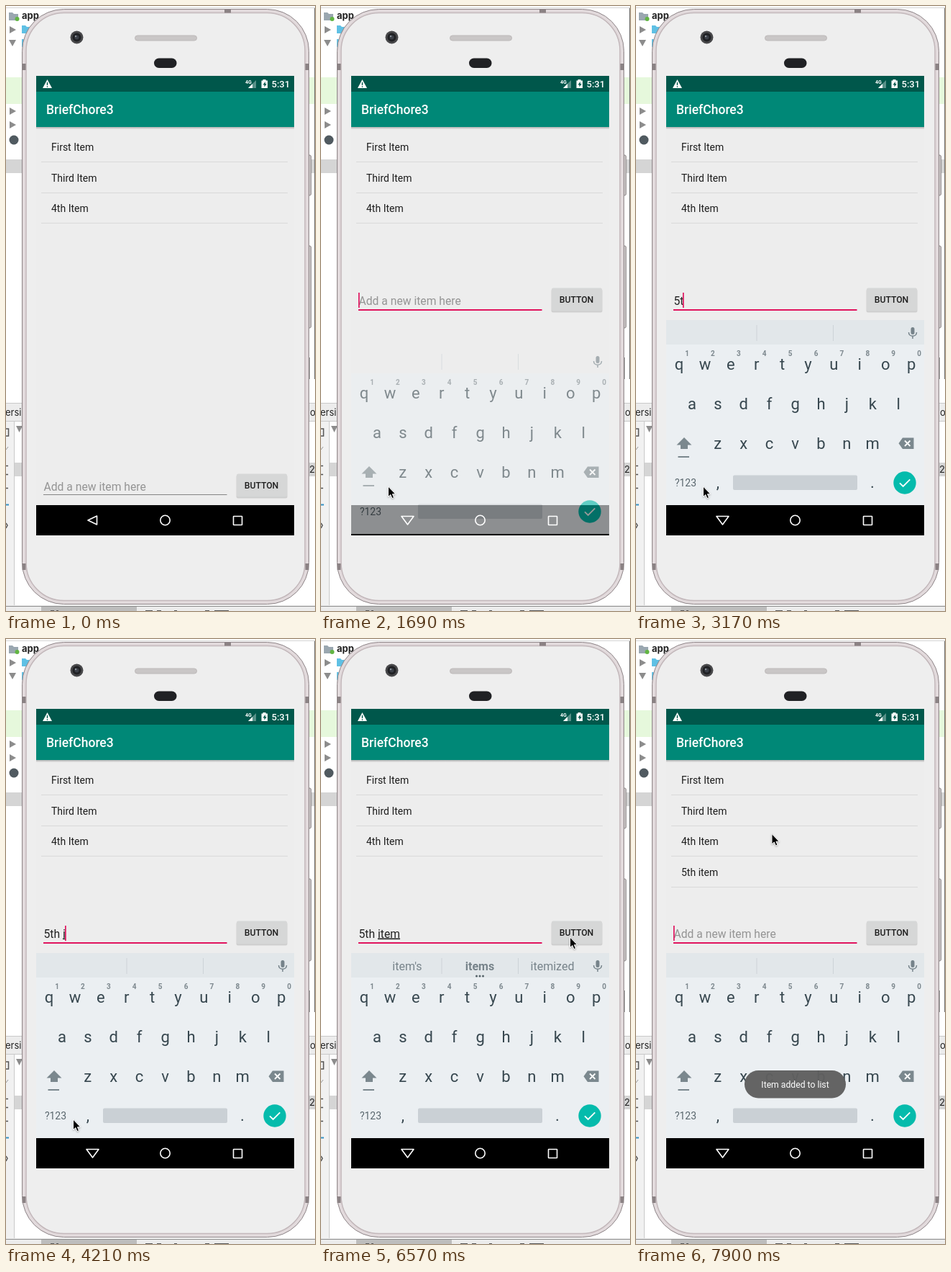
Animation of 430x840 px, one loop 8 s. Source, as an HTML page:

```html
<!DOCTYPE html>
<html lang="en">
<head>
<meta charset="utf-8">
<title>To-do list demo</title>
<style>
html, body { margin: 0; width: 100%; height: 100%; overflow: hidden; background: #fff; }
svg { display: block; width: 430px; height: 840px; }
text { font-family: Roboto, "Open Sans", sans-serif; white-space: pre; }
.mid { text-anchor: middle; }
.ide { font: 13px Inter, sans-serif; fill: #222; }
.bold { font-weight: 700; }
.item { font-size: 14px; fill: #1d1d1d; }
.entry { font-size: 15.7px; }
.key { font-size: 22px; fill: #37474f; text-anchor: middle; }
.digit { font-size: 10px; font-weight: 700; fill: #7d888e; text-anchor: middle; }
.word { font-size: 16px; fill: #77838a; text-anchor: middle; }
#mouse { filter: drop-shadow(0 1px 1px rgba(0, 0, 0, .3)); }
</style>
</head>
<body>
<svg viewBox="0 0 430 840" width="430" height="840">
  <defs>
    <linearGradient id="shade" x1="0" x2="0" y1="0" y2="1">
      <stop offset="0" stop-color="#000" stop-opacity=".25"/><stop offset="1" stop-color="#000" stop-opacity="0"/>
    </linearGradient>
  </defs>

  <!-- editor window behind the phone -->
  <g id="window">
    <rect width="430" height="840" fill="#fff"/>
    <path d="M0 2.5H430" stroke="#d4d4d4"/>
    <rect y="99" width="429" height="37" fill="#e6f8dc"/>
    <rect y="213" width="429" height="19" fill="#d5d5d5"/>
    <path d="M429.5 3V518" stroke="#777"/>
    <path d="M4 9h5l2 2h6v9H4z" fill="#9aa7b0"/>
    <circle cx="15.5" cy="18" r="3" fill="#62b543"/>
    <text class="ide bold" x="22" y="18">app</text>
    <path d="M5 28l9 5-9 5zM4 47h10l-5 9zM5 141l9 5-9 5zM5 160l9 5-9 5z" fill="#8c8c8c"/>
    <path d="M22 27h5l2 2h8v9H22zM22 46h5l2 2h8v9H22z" fill="#5fc0e4"/>
    <circle cx="11" cy="186" r="6.5" fill="#505a60"/>
    <rect y="551" width="430" height="26" fill="#ececec"/>
    <path d="M0 551.5H430M0 576.5H430" stroke="#c9c9c9"/>
    <text class="ide" x="-1" y="569">ersi</text>
    <text class="ide" x="423" y="569">o</text>
    <rect y="577" width="11" height="256" fill="#f1f1f1"/>
    <path d="M11.5 577V832" stroke="#c9c9c9"/>
    <path d="M14 583h9l-4.5 9z" fill="#8c8c8c"/>
    <rect x="12" y="634" width="418" height="19" fill="#d5d5d5"/>
    <text class="ide" x="422" y="648">2</text>
    <path d="M0 587h3.5v10H0M0 638.5h3M0 650.5h3M0 669.5h3M0 718l2 3-2 4" fill="none" stroke="#555" stroke-width="1.5"/>
    <path d="M0 616l3-4" stroke="#999"/>
    <path d="M0 692.5h4" stroke="#3592c4" stroke-width="2"/>
    <rect y="832" width="430" height="8" fill="#ececec"/>
    <rect x="49" y="834" width="133" height="6" fill="#bdbdbd"/>
    <path d="M0 833.5H430" stroke="#8f8f8f"/>
    <path d="M62 839.5h5M70 839.5h3M194 839.5h10M210 839.5h6M234 839.5h4M277 839.5h6M290 839.5h20" stroke="#555"/>
  </g>

  <!-- phone -->
  <g id="phone">
    <rect x="419" y="207" width="5.5" height="56" rx="2" fill="#cfcaca" stroke="#8b8687"/>
    <rect x="419" y="333" width="5.5" height="114" rx="2" fill="#cfcaca" stroke="#8b8687"/>
    <path d="M422.5 488V518" stroke="#999"/>
    <rect x="22.5" y="4.5" width="399" height="826" rx="58" fill="#e2dadc" stroke="#8d8487"/>
    <rect x="28" y="9.5" width="388" height="816" rx="52.5" fill="#eee" stroke="#c3b8bb" stroke-width="1.5"/>
    <path d="M304 4.5h9v5h-9zM22.5 80h5v9h-5zM416.5 80h5v9h-5zM22.5 774h5v9h-5zM416.5 774h5v9h-5z" fill="#8b8284"/>
    <rect x="179.5" y="41" width="86" height="7" rx="3.5" fill="#c9c6c6" stroke="#bdb9b9"/>
    <circle cx="98.5" cy="43.5" r="9" fill="#48484a"/>
    <circle cx="98.5" cy="43.5" r="6" fill="#202124"/>
    <circle cx="98.5" cy="43.5" r="3" fill="#3c4048"/>
    <circle cx="97" cy="42" r="1.2" fill="#8d949c"/>
    <rect x="206" y="72.5" width="31.5" height="13.5" rx="6.75" fill="#202124"/>
  </g>

  <!-- app -->
  <rect x="42" y="97" width="359" height="638" fill="#ededed"/>
  <rect x="42" y="97" width="359" height="22" fill="#00574b"/>
  <rect x="42" y="119" width="359" height="49" fill="#008877"/>
  <rect x="42" y="168" width="359" height="3.5" fill="url(#shade)"/>
  <path d="M57.5 102l6.5 12H51z" fill="#fff"/>
  <path d="M57.5 106v4M57.5 111.2v1.6" stroke="#00574b" stroke-width="1.4"/>
  <text x="333" y="108" font-size="7" font-weight="700" fill="#fff">4G</text>
  <path d="M348 103v11h-11z" fill="#fff" opacity=".35"/>
  <path d="M343 108v6h-6z" fill="#fff"/>
  <path d="M357.5 102h4v1.5h2.5V114h-8.5v-10.5h2z" fill="#fff"/>
  <path d="M360.8 105l-3.3 4.5h2v3l3.2-4.5h-1.9z" fill="#00574b"/>
  <text x="369.5" y="112.5" font-size="13" font-weight="500" fill="#fff">5:31</text>
  <text x="56" y="150" font-size="17.5" font-weight="500" fill="#fff">BriefChore3</text>
  <g id="list"></g>

  <g id="form">
    <text id="entry" class="entry" x="52.5" y="414.5"><tspan id="plain"></tspan><tspan id="composing" text-decoration="underline"></tspan></text>
    <rect id="line" x="52" width="255.5"/>
    <rect id="caret" y="398" width="1.7" height="21" fill="#e0145e"/>
    <rect x="320.5" y="393" width="71" height="32.5" rx="2.5" fill="#000" opacity=".13"/>
    <rect id="button" x="321" y="391.5" width="70" height="32" rx="2"/>
    <text class="mid" x="355.5" y="412" font-size="12.2" font-weight="500" fill="#1d1d1d">BUTTON</text>
  </g>

  <rect x="42" y="693" width="359" height="42" fill="#000"/>
  <g id="keyboard">
    <rect x="42" y="470" width="359" height="223" fill="#ebeff2"/>
    <rect id="strip" x="42" y="436" width="359" height="34" fill="#e2e7ea"/>
    <path d="M168 443v22M274.5 443v22" stroke="#cdd3d7"/>
    <g id="words"></g>
    <g id="dots" fill="#546168"><circle cx="216.5" cy="468" r="1.5"/><circle cx="221" cy="468" r="1.5"/><circle cx="225.5" cy="468" r="1.5"/></g>
    <rect x="382.5" y="446" width="5" height="10" rx="2.5" fill="#76838a"/>
    <path d="M379.5 453c0 7 11 7 11 0M385 458.5v3.5" fill="none" stroke="#76838a" stroke-width="1.5"/>
    <g id="keys"></g>
    <path d="M67 599l10.5 10.5H72v5.5H62v-5.5h-5.5zM58.5 625h15.5v2H58.5z" fill="#7b888e"/>
    <path d="M371 599.5h15.5v15.5H371l-5.5-7.75z" fill="#7b888e"/>
    <path d="M374 603.5l7.5 7.5m0-7.5l-7.5 7.5" stroke="#fff" stroke-width="1.8"/>
    <text class="mid" x="69" y="667" font-size="14" fill="#5a676e">?123</text>
    <g id="marks"><text class="key" x="114" y="669">,</text><text class="key" x="329" y="669">.</text></g>
    <rect x="135" y="651.5" width="173" height="20.5" rx="2" fill="#cad0d5"/>
    <circle cx="374" cy="662" r="15.7" fill="#05bbac"/>
    <path d="M367 662.3l4.7 4.7 9.6-9.6" fill="none" stroke="#fff" stroke-width="1.8"/>
  </g>
  <g fill="none" stroke="#fff" stroke-width="1.6">
    <path id="back" stroke-linejoin="round"/>
    <circle cx="221.5" cy="714" r="6.7"/>
    <rect x="316.5" y="708.5" width="12" height="12" rx=".5"/>
  </g>

  <g id="toast">
    <rect x="151" y="599" width="141" height="38.5" rx="19.25" fill="#5f5f5f"/>
    <text class="mid" x="221.5" y="623" font-size="12.2" fill="#fff">Item added to list</text>
  </g>
  <path id="mouse" d="M0 0V14.5L3.3 11.5L5.5 16.6L8 15.5L5.9 10.7H10.3Z" fill="#000" stroke="#fff" stroke-width="1"/>
</svg>

<script>
const LOOP = 8000, TICK = 148, START = 495;
const $ = id => document.getElementById(id);
const show = (id, on) => $(id).setAttribute('visibility', on ? 'visible' : 'hidden');
const set = (id, attrs) => { for (const a in attrs) $(id).setAttribute(a, attrs[a]); };
const label = (cls, x, y, s) => `<text class="${cls}" x="${x}" y="${y}">${s}</text>`;
const between = (k, a, b) => k >= a && k < b;

$('list').innerHTML = ['First Item', 'Third Item', '4th Item', '5th item'].map((s, i) => {
  const y = 201 + i * 42.5, rule = Math.floor(216.5 + i * 42.6) + .5;
  return `<g id="item${i}">${label('item', 63, y, s)}<path d="M49 ${rule}H392" stroke="#d9d9d9"/></g>`;
}).join('');

const PITCH = 35.9;
$('keys').innerHTML = [['qwertyuiop', 60, 505], ['asdfghjkl', 78, 560], ['zxcvbnm', 113.8, 615]]
  .map(([row, x, y]) => [...row].map((c, i) => label('key', x + i * PITCH, y, c)).join('')).join('')
  + [...'1234567890'].map((c, i) => label('digit', 71 + i * PITCH, 486, c)).join('');
$('words').innerHTML = [120, 221, 322].map((x, i) =>
  `<text id="word${i}" class="word${i === 1 ? ' bold' : ''}" x="${x}" y="460"></text>`).join('');

// [first tick, settled text, underlined text]
const TYPED = [[0, '', ''], [16, '5', ''], [18, '5t', ''], [19, '5', 'th'], [23, '5th ', ''],
  [25, '5th ', 'i'], [27, '5th ', 'it'], [29, '5th ', 'ite'], [31, '5th ', 'item'], [44, '', '']];
const WORDS = [[0], [19, 'thanks', 'the', 'this'], [20], [26, 'in', 'I', 'is'], [28, "it's", 'it', 'its'],
  [30, 'items', 'item', 'iterate'], [31, "item's", 'items', 'itemized'], [44]];
// [first tick, last tick, from, to]
const MOVES = [[0, 4, [269, 517.5], [93.5, 667]], [34, 41, [93.5, 667], [346.5, 414]], [46, 50, [346.5, 414], [189, 270.5]]];
const CARET_OFF = [[11, 14], [23, 25], [34, 38], [41, 44], [47, 50]];

const latest = (rows, k) => rows.filter(r => r[0] <= k).pop() || rows[0];
const ease = u => u * u * (3 - 2 * u);

function drawForm(k) {
  const focused = k >= 7, raised = k >= 8;
  const [, plain, composing] = latest(TYPED, k);
  const empty = !(plain + composing);
  // The space after "5th" lands before the underline clears.
  const gap = between(k, 20, 23) ? 15.7 * .248 : 0;
  $('plain').textContent = empty ? 'Add a new item here' : plain;
  $('composing').textContent = composing;
  set('entry', { fill: empty ? '#949494' : '#222' });
  const width = empty ? 0 : $('entry').getComputedTextLength() + gap;
  set('caret', { x: 52 + Math.floor(width) });
  show('caret', focused && !CARET_OFF.some(([a, b]) => between(k, a, b)));
  set('line', focused ? { y: 421, height: 2, fill: '#e0145e' } : { y: 420, height: 1, fill: '#858585' });
  set('button', { fill: k === 43 ? '#bcbdbd' : k === 44 ? '#c8c9c9' : '#d6d7d7' });
  set('form', { transform: `translate(0 ${raised ? 0 : 258})` });
}

function drawKeyboard(k) {
  const rising = k === 8;
  show('keyboard', k >= 8);
  set('keyboard', { opacity: rising ? .6 : 1, transform: `translate(0 ${rising ? 40 : 0})` });
  set('strip', { opacity: rising ? .15 : 1 });
  set('marks', { opacity: rising ? 0 : 1 });
  const words = latest(WORDS, k).slice(1);
  for (let i = 0; i < 3; i++) $('word' + i).textContent = words[i] || '';
  set('dots', { opacity: words.length ? 1 : 0 });
  set('back', { d: k >= 8 ? 'M112 708.5H129L120.5 720Z' : 'M126.5 708V720L114 714Z' });
}

function drawMouse(k) {
  const [a, b, p, q] = latest(MOVES, k);
  const u = ease(Math.min(1, Math.max(0, (k - a) / (b - a))));
  const [x, y] = p.map((v, i) => v + (q[i] - v) * u);
  set('mouse', { transform: `translate(${x} ${y})` });
  show('mouse', k >= 0);
}

function render(ms) {
  const k = Math.floor((ms - START) / TICK);
  drawForm(k);
  drawKeyboard(k);
  drawMouse(k);
  show('item3', k >= 44);
  set('toast', { opacity: k < 45 ? 0 : k === 45 ? .65 : .96 });
}

const t0 = performance.now();
function loop() {
  render((performance.now() - t0) % LOOP);
  requestAnimationFrame(loop);
}
loop();
</script>
</body>
</html>
```
